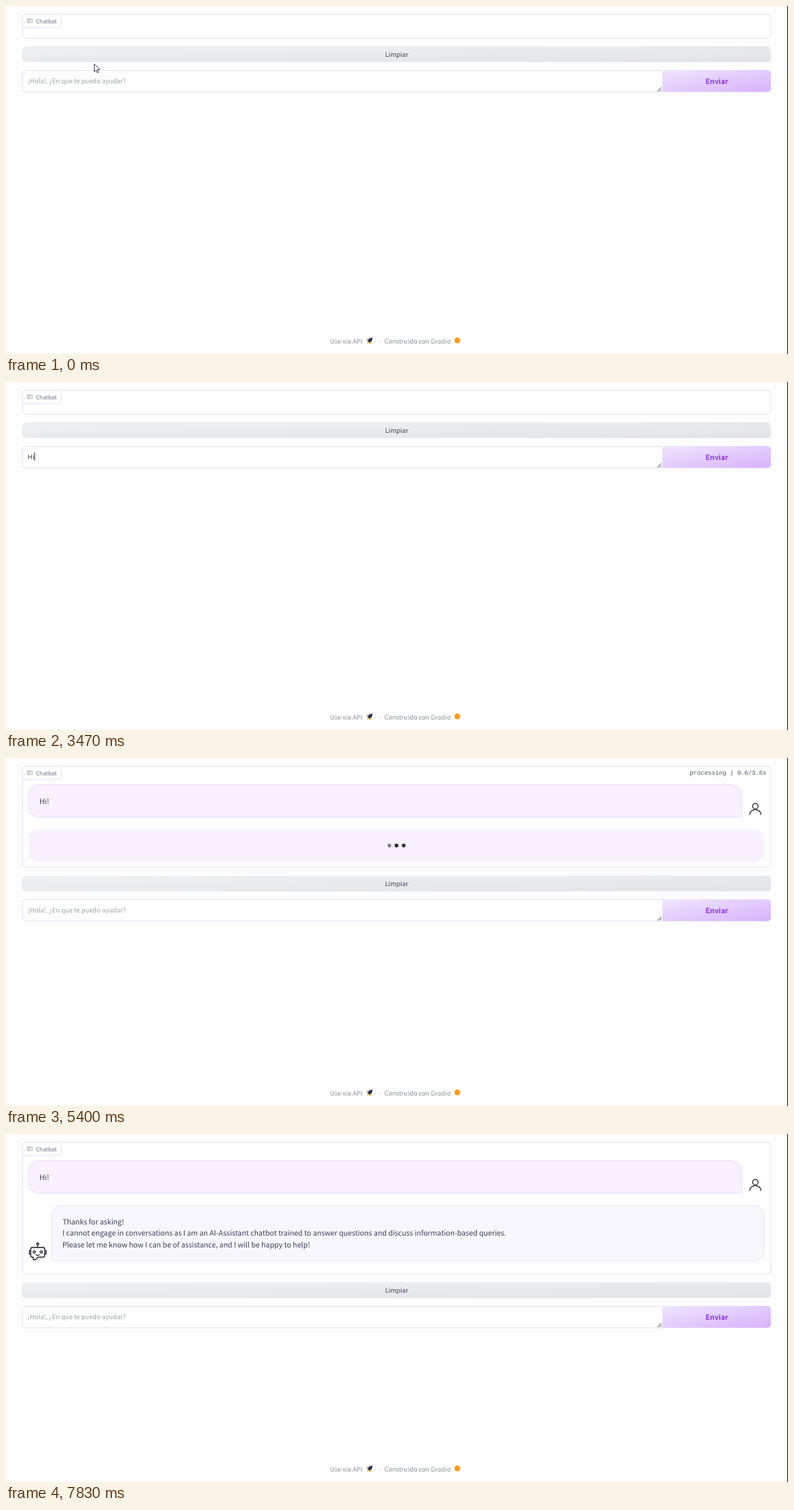
Recreate the animation shown at these times as an HTML page. Size 1121 px wide and 500 px high, loop 8 s.

```html
<!DOCTYPE html>
<html lang="es">
<head>
<meta charset="utf-8">
<title>Chatbot</title>
<style>
  html, body { margin: 0; width: 100%; height: 100%; overflow: hidden; background: #fdfdfd; }
  svg { display: block; width: 100%; height: 100%; }
  text {
    font: 9.17px "Noto Sans CJK JP", "Noto Sans CJK SC", "Noto Sans CJK", "Open Sans", sans-serif;
    fill: #374151; text-rendering: geometricPrecision; white-space: pre;
  }
  .message { font-size: 10.39px; }
  .label { font-size: 7.95px; fill: #6b7280; }
  .muted { fill: #9ca3af; }
  .footer { font-size: 9.1px; fill: #8b919c; }
  .send { font-size: 10.3px; font-weight: 600; fill: #8a35d6; text-anchor: middle; }
  .mono { font: 8.73px "Liberation Mono", "DejaVu Sans Mono", monospace; fill: #4b5563; text-anchor: end; }
  .box { fill: #fdfdfd; stroke: #e4e2f3; }
  .line { fill: none; stroke: #1c1c28; stroke-width: 1.3; stroke-linecap: round; stroke-linejoin: round; }
</style>
</head>
<body>
<svg viewBox="0 0 1121 500">
  <defs>
    <linearGradient id="gray" x2="1" y2="1">
      <stop stop-color="#f0f1f2"/><stop offset="1" stop-color="#e1e3e8"/>
    </linearGradient>
    <linearGradient id="purple" x2="1" y2="1">
      <stop stop-color="#f0e6fe"/><stop offset="1" stop-color="#d6b2fc"/>
    </linearGradient>
  </defs>
  <rect width="1121" height="500" fill="#fdfdfd"/>

  <rect id="panel" class="box" x="23.5" y="11.5" width="1073" height="34.5" rx="5"/>
  <path class="box" d="M23.5 31V16.5a5 5 0 0 1 5-5H79V27a4 4 0 0 1-4 4Z"/>
  <path d="M30.5 18.5h7v5h-3l-1.5 1.5v-1.5h-2.5ZM32 20.2h4M32 21.8h2.5" fill="none" stroke="#8b919c" stroke-width=".7"/>
  <text class="label" x="43" y="24.6">Chatbot</text>

  <g id="question">
    <path d="M1054.5 85H46.5a14 14 0 0 1-14-14V52.5a14 14 0 0 1 14-14H1040.5a14 14 0 0 1 14 14Z" fill="#f9f1fe" stroke="#ecdcfb"/>
    <text class="message" x="48" y="66">Hi!</text>
    <g class="line"><circle cx="1074.2" cy="69.3" r="4"/><path d="M1066.2 81a8 6.8 0 0 1 16 0"/></g>
  </g>
  <g id="pending">
    <rect x="32.5" y="103" width="1054" height="46.5" rx="14" fill="#f9f1fe"/>
    <g id="dots" fill="#1f2233">
      <circle cx="549.6" cy="125.8" r="2.7"/><circle cx="559.8" cy="125.8" r="2.7"/><circle cx="570.1" cy="125.8" r="2.7"/>
    </g>
  </g>
  <g id="answer">
    <path d="M65.5 182V116.5a14 14 0 0 1 14-14H1072.5a14 14 0 0 1 14 14V168a14 14 0 0 1-14 14Z" fill="#f8f7fd" stroke="#e8e5f7"/>
    <text class="message" x="81" y="130">Thanks for asking!</text>
    <text class="message" x="81" y="146.4">I cannot engage in conversations as I am an AI-Assistant chatbot trained to answer questions and discuss information-based queries.</text>
    <text class="message" x="81" y="162.8">Please let me know how I can be of assistance, and I will be happy to help!</text>
    <g class="line">
      <path d="M45.5 163v-3.5M38 163h15a2.5 2.5 0 0 1 2.5 2.5v9a2.5 2.5 0 0 1-2.5 2.5H46l-4 3.5h-3v-3.500h-1a2.500 2.500 0 0 1-2.500-2.500v-9a2.500 2.500 0 0 1 2.500-2.500ZM35.500 167.500h-2v5h2M55.500 167.500h2v5h-2M43 173.500q2.500 2 5 0"/>
      <circle cx="45.500" cy="158" r="1.500"/><circle cx="40.500" cy="169.500" r="1.700"/><circle cx="50.500" cy="169.500" r="1.700"/>
    </g>
  </g>
  <text id="status" class="mono" x="1090" y="24.3"></text>

  <g id="controls">
    <rect x="23" y="58" width="1073.500" height="22.500" rx="5" fill="url(#gray)"/>
    <text x="560" y="72.600" text-anchor="middle">Limpiar</text>
    <path class="box" d="M941 123.500H28.500a5 5 0 0 1-5-5V97.500a5 5 0 0 1 5-5H941"/>
    <text id="hint" class="muted" x="31.300" y="110.500">¡Hola!, ¿En que te puedo ayudar?</text>
    <text id="typed" x="31.300" y="110.500"></text>
    <rect id="caret" y="100.800" width="1" height="12.500" fill="#30343c"/>
    <path d="M934 122.500l5.500-5.500M937 122.500l2.500-2.500" stroke="#444" fill="none"/>
    <g id="cover">
      <rect x="24" y="93" width="916.500" height="30" rx="4" fill="#fdfdfd"/>
      <g id="loading">
        <rect id="bar" x="24" y="93" height="30" fill="#f7f6fd"/>
        <circle cx="481.500" cy="107" r="5.500" fill="#a44df0"/>
        <text id="timer" class="mono" x="935" y="104.500"></text>
      </g>
    </g>
    <path d="M941 92H1091.500a5 5 0 0 1 5 5V118.500a5 5 0 0 1-5 5H941Z" fill="url(#purple)"/>
    <text class="send" x="1019" y="112">Enviar</text>
  </g>

  <text class="footer" x="464.500" y="484.500">Use via API</text>
  <path d="M525.500 476.500l-1 4.500-3.500 3-3-3 3-3.500Z" fill="#26304d"/>
  <path d="M519.500 477.500l-3 2 1.500 1.500ZM524.500 481.500l-2 4-1.500-1.500ZM519 481.500l1.500 1.500-3.500 2.500Z" fill="#f59428"/>
  <text class="footer" x="533.500" y="484.500">·</text>
  <text class="footer" x="542.500" y="484.500">Construido con Gradio</text>
  <circle cx="647" cy="480.500" r="4.300" fill="#f7a023"/>

  <path id="arrow" d="M0 0V11.500L2.700 9 4.500 13 6.300 12.200 4.500 8.400H8Z" fill="#fff" stroke="#34304f" stroke-width=".9"/>
  <path id="beam" d="M-2-7h4M0-7V7M-2 7h4" fill="none" stroke="#333" stroke-width=".9"/>
  <rect x="1120" width="1" height="500" fill="#111"/>
</svg>
<script>
const LOOP = 8000, SUBMIT = 4470, ASKED = 4765, FADE = 130, QUEUED = 4960, DOTS = 4810, REPLY = 7740;
const ui = {};
document.querySelectorAll('[id]').forEach(el => ui[el.id] = el);

// [time, value] steps; each value holds until the next one
const typing = [[0, ''], [2030, 'H'], [2130, 'Hi'], [3900, 'Hi!'], [SUBMIT, '']];
const caretOn = [[0, false], [430, true], [930, false], [1500, true], [2970, false], [3470, true],
  [SUBMIT, false], [6350, true], [6930, false], [7300, true], [7830, false]];
// [time, x, y, shape]
const pointer = [[0, 126.5, 83, 'arrow'], [70, 126.5, 83, 'arrow'], [190, 90, 94, 'beam'], [430, 33, 107, 'beam'],
  [570, 33, 107, ''], [5600, 5, 478, 'arrow'], [6000, 31.5, 150, 'arrow'], [6130, 32, 203, 'beam'], [6300, 33, 218, 'beam'], [6350, 33, 218, '']];

const clamp = v => Math.min(1, Math.max(0, v));
const last = (steps, t) => steps.reduce((found, step, i) => step[0] <= t ? i : found, 0);
const valueAt = (steps, t) => steps[last(steps, t)][1];
const show = (el, on) => el.style.display = on ? '' : 'none';
const setText = (el, s) => { if (el.textContent !== s) el.textContent = s; };
const seconds = ms => (ms / 1000).toFixed(1);
const ease = x => (1 - Math.cos(Math.PI * x)) / 2;

function flash(elapsed) {
  if (elapsed < 0) return 1;
  const p = elapsed % 1000 / 500;
  return ease(p < 1 ? p : 2 - p);
}

function drawPointer(t) {
  const i = last(pointer, t), a = pointer[i], b = pointer[i + 1] || a;
  const k = a === b ? 0 : ease(clamp((t - a[0]) / (b[0] - a[0])));
  const place = `translate(${a[1] + (b[1] - a[1]) * k} ${a[2] + (b[2] - a[2]) * k})`;
  for (const name of ['arrow', 'beam']) {
    show(ui[name], a[3] === name);
    ui[name].setAttribute('transform', place);
  }
}

function draw(t) {
  const asked = t >= ASKED, replied = t >= REPLY, waiting = asked && !replied;
  const shift = replied ? 155 : asked ? 111 : 0;
  ui.panel.setAttribute('height', 34.5 + shift);
  ui.controls.setAttribute('transform', `translate(0 ${shift})`);
  show(ui.question, asked);
  show(ui.pending, waiting);
  show(ui.answer, replied);

  const fade = clamp((t - ASKED) / FADE);
  show(ui.status, waiting);
  ui.status.style.opacity = fade;
  const stage = t < QUEUED ? 'queue: 1/1' : 'processing';
  setText(ui.status, `${stage} | ${seconds(Math.max(0, t - ASKED))}/3.6s`);
  [330, 660, 0].forEach((delay, i) => ui.dots.children[i].style.opacity = flash(t - DOTS - delay));

  show(ui.cover, t >= SUBMIT && fade < 1);
  ui.cover.style.opacity = 1 - fade;
  show(ui.loading, !asked);
  ui.bar.setAttribute('width', 916.5 * clamp((t - SUBMIT) / 410));
  setText(ui.timer, seconds(Math.max(0, t - SUBMIT)) + 's');

  const typed = valueAt(typing, t);
  setText(ui.typed, typed);
  show(ui.hint, !typed);
  show(ui.caret, valueAt(caretOn, t));
  ui.caret.setAttribute('x', 31.3 + (typed ? ui.typed.getComputedTextLength() : 0));
  drawPointer(t);
}

const start = performance.now();
function tick() {
  draw((performance.now() - start) % LOOP);
  requestAnimationFrame(tick);
}
tick();
</script>
</body>
</html>
```
